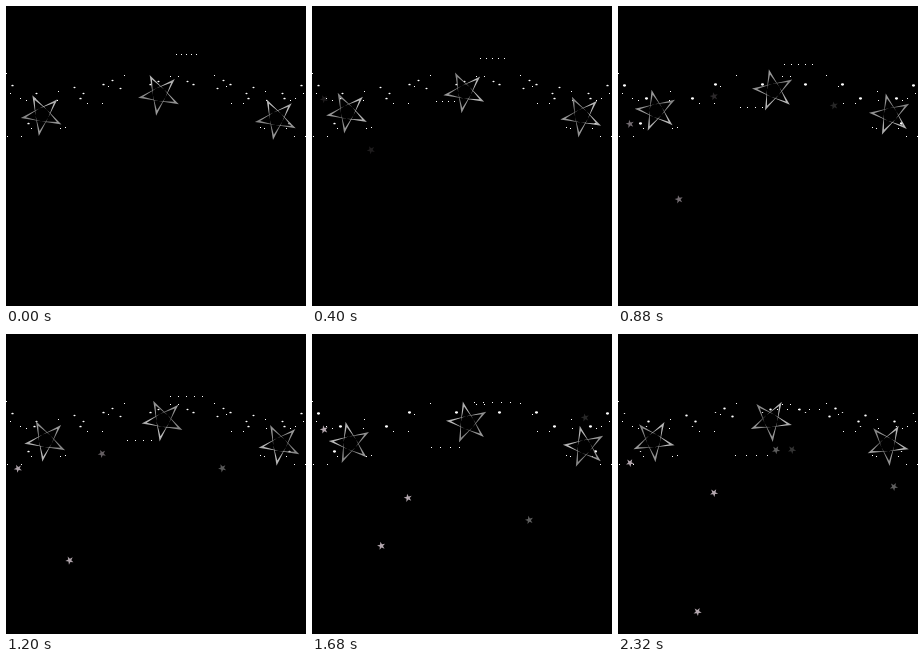
Write an HTML page that moves like this. It is 300 px wide and 300 px high and loops after 2.4 s.

```html
<!DOCTYPE html>
<html lang="en">
<head>
<meta charset="utf-8">
<title>Falling stars</title>
<style>
  html, body { margin: 0; width: 100%; height: 100%; overflow: hidden; background: #000; }
  svg { display: block; width: 100vw; height: 100vh; }
</style>
</head>
<body>
<svg id="stage" viewBox="0 0 300 300">
  <defs>
    <linearGradient id="metal" x1="0" y1="0" x2="1" y2="1">
      <stop offset="0" stop-color="#aaa"/>
      <stop offset=".35" stop-color="#858585"/>
      <stop offset=".65" stop-color="#bbb"/>
      <stop offset="1" stop-color="#888"/>
    </linearGradient>
  </defs>
  <rect width="300" height="300" fill="#000"/>
</svg>
<script>
const LOOP = 2400, STEP = 80, TAU = Math.PI * 2;
const TURN = 0.18;        // degrees per ms
const TWINKLE = 400, LIFE = 1280, HOP = 64;
const stage = document.getElementById('stage');

function add(tag, attrs) {
  const el = document.createElementNS('http://www.w3.org/2000/svg', tag);
  set(el, attrs);
  return stage.appendChild(el);
}
function set(el, attrs) {
  for (const key in attrs) el.setAttribute(key, attrs[key]);
}
const range = n => [...Array(n).keys()];
const polar = (r, a) => [r * Math.cos(a), r * Math.sin(a)];
const polygon = points => 'M' + points.map(p => p.map(v => v.toFixed(2)).join(' ')).join('L') + 'Z';
const place = (el, x, y, turn) =>
  el.setAttribute('transform', `translate(${x.toFixed(2)} ${y.toFixed(2)}) rotate(${turn})`);

// Each point is a V of two blades that taper along the lines of a pentagram.
function ribbonStar(radius) {
  const tip = i => polar(radius, i * TAU / 5);
  const toward = (a, b, k) => a.map((v, j) => v + (b[j] - v) * k);
  return range(5).map(i => polygon([
    tip(i), toward(tip(i), tip(i + 2), 0.5),
    polar(radius * 0.76, i * TAU / 5), toward(tip(i), tip(i - 2), 0.5)
  ])).join('');
}
const solidStar = (outer, inner) =>
  polygon(range(10).map(i => polar(i % 2 ? inner : outer, i * TAU / 10)));

const speck = (x, y) =>
  add('rect', { x, y, width: 1, height: 1, fill: '#fff', 'shape-rendering': 'crispEdges' });
const glint = (x, y) => add('ellipse', { cx: x + 0.5, cy: y + 0.5, fill: '#fff' });

// The garland's right half is a narrower mirror image of its left half.
const garland = (make, points) => points.flatMap(([x, y]) =>
  [make(x, y), make(Math.round(299.7 - 0.78 * x), y)]);

garland(speck, [[0, 67], [4, 87], [14, 92], [20, 94], [51, 94], [52, 85], [81, 97], [96, 97],
  [102, 80], [118, 69], [164, 70], [1, 130], [15, 130], [25, 122], [54, 122], [59, 121]]);
const evenGlints = garland(glint, [[6, 79], [28, 92], [74, 92], [97, 78], [144, 78], [22, 117]]);
const oddGlints = garland(glint, [[30, 87], [68, 81], [77, 87], [106, 74], [114, 82], [152, 75]]);

// Sprays of specks that spread out as they sink.
const spray = (count, x, y, fall, start) => range(count).map(i => ({
  el: speck(x, y), side: i - (count - 1) / 2, x, y, fall, start
}));
const sparks = [
  ...spray(5, 180, 47.5, 12, 0),
  ...spray(4, 133, 89, 14, 400)
];

const bigStars = [[37.6, 106.9], [154.9, 86.6], [271.8, 110.8]].map(([x, y]) => ({
  x, y, el: add('path', { d: ribbonStar(21.7), fill: 'url(#metal)' })
}));

// Bright stars hop back up after one life; dim ones vanish.
const fallers = [
  { x: 12, y: 93, speed: 52, born: 400, bright: true },
  { x: 59, y: 144, speed: 103, born: 400, bright: true, bend: 22 },
  { x: 96, y: 83, speed: 92, born: 800, bright: true },
  { x: 216, y: 91, speed: 108, born: 800, bend: 5 },
  { x: 273, y: 75, speed: 108, born: 1600, bend: 16 },
  { x: 158, y: 92, speed: 50, born: 1840 },
  { x: 174, y: 99, speed: 105, born: 2160 }
];
for (const f of fallers)
  f.el = add('path', { d: solidStar(4.3, 1.7), fill: f.bright ? '#d2c4cd' : '#bbb' });

function draw(t) {
  const turn = t * TURN - 117;
  const wave = Math.sin(t / TWINKLE * TAU);
  const size = (el, r) => set(el, { rx: r * 1.25, ry: r * 0.9 });

  // The turning point sits slightly off each star's centre.
  const [dx, dy] = polar(2.2, (t * TURN + 130) * TAU / 360);
  for (const s of bigStars) place(s.el, s.x + dx, s.y + dy, turn);

  for (const g of evenGlints) size(g, 0.95 + 0.35 * wave);
  for (const g of oddGlints) size(g, Math.min(1, Math.max(0, 0.85 - 0.85 * wave)));

  for (const p of sparks) {
    const s = t / 1000;
    set(p.el, {
      x: Math.round(p.x + p.side * (5 + 2.4 * s)),
      y: Math.round(p.y + p.fall * s),
      opacity: t >= p.start ? 1 : 0
    });
  }

  for (const f of fallers) {
    const age = t - f.born, s = Math.max(0, age) / 1000, old = age >= LIFE;
    const glow = Math.min(f.bright ? 0.85 : 0.5, 0.14 + 0.85 * s);
    place(f.el, f.x + (f.bend || 0) * (s / 2) ** 1.7, f.y + f.speed * s - (old ? HOP : 0), turn);
    f.el.setAttribute('opacity', age < 0 || old && !f.bright ? 0 : glow);
  }
}

const start = performance.now();
function tick() {
  const t = (performance.now() - start) % LOOP;
  draw(Math.floor(t / STEP) * STEP);
  requestAnimationFrame(tick);
}
tick();
</script>
</body>
</html>
```
